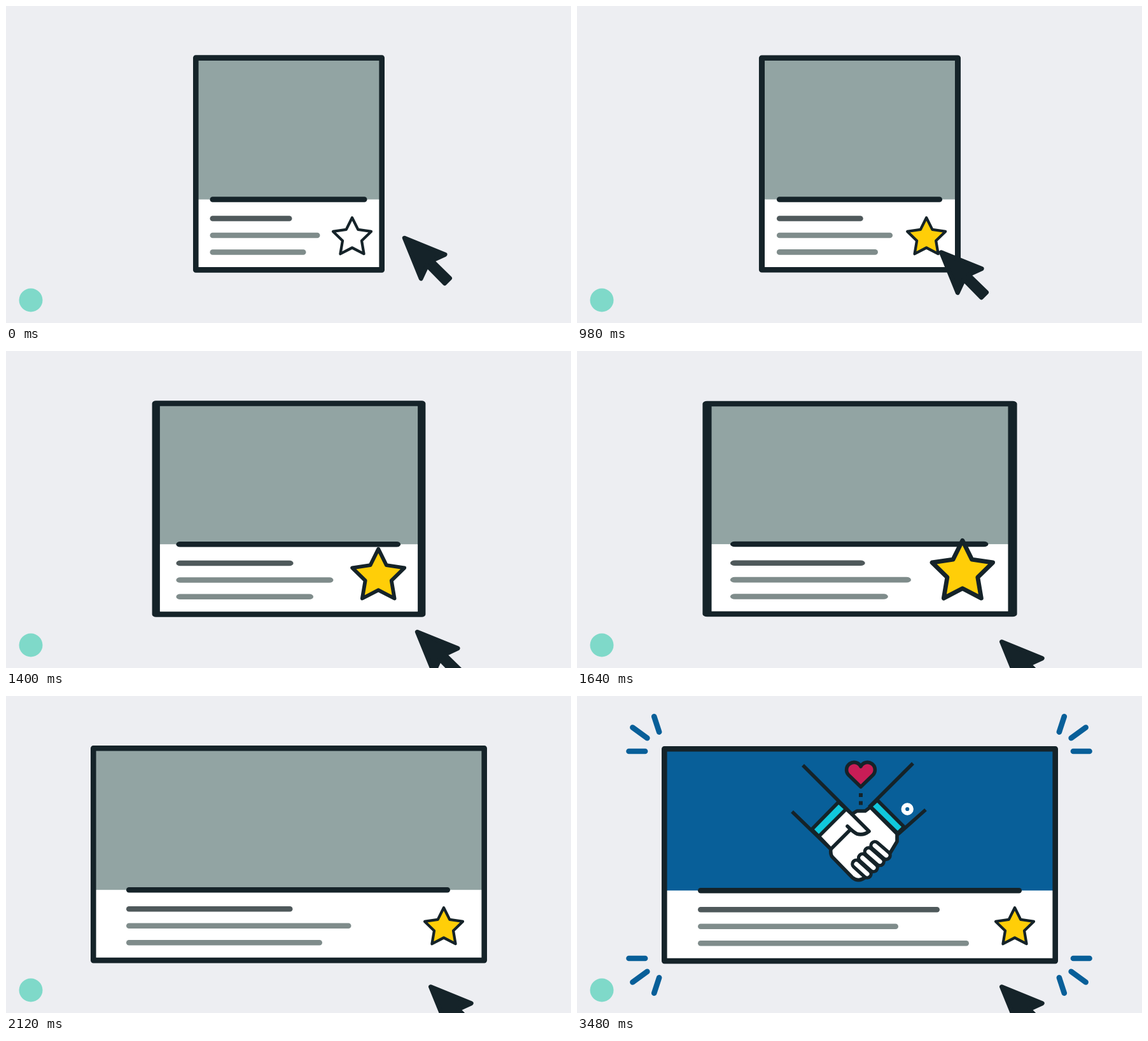
Recreate the animation shown at these times as an HTML page. Size 888 by 499 pixels, loop 4080 ms.

```html
<!DOCTYPE html>
<html lang="en">
<head>
<meta charset="utf-8">
<title>Card favourite</title>
<style>
html, body { margin: 0; width: 100%; height: 100%; overflow: hidden; background: #edeef2; }
svg { display: block; width: 100%; height: 100%; }
</style>
</head>
<body>
<svg id="stage" viewBox="0 0 888 499" fill="none" stroke-linecap="round" stroke-linejoin="round"></svg>
<script>
const INK = '#152329', GREY = '#92a4a3', SLATE = '#4f595b', MIST = '#7f8c8b';
const BLUE = '#085f99', PINK = '#c81d56', CYAN = '#10c8dc', GOLD = '#ffce08', MINT = '#7fd9c9';
const LOOP = 4080, STEP = 30, PEN = 8.6, HEIGHT = 342.4, DIVIDER = 227.2;

const path = (d, fill = 'none', width = 5.6, stroke = INK) =>
  `<path d="${d}" fill="${fill}" stroke="${stroke}" stroke-width="${width}"/>`;
const line = (x1, y1, x2, y2, color = INK, width = PEN) =>
  path(`M${x1} ${y1}L${x2} ${y2}`, 'none', width, color);
const rect = (x, y, w, h, attrs) =>
  `<rect x="${x}" y="${y}" width="${w}" height="${h}" ${attrs}/>`;
const group = (id, body) => `<g id="${id}">${body}</g>`;
const polar = (cx, cy, r, deg) => {
  const a = deg * Math.PI / 180;
  return [cx + r * Math.cos(a), cy + r * Math.sin(a)];
};

// A framed picture over four text bars: divider, heading and two lines.
function card(left, top, right, color, indent, widths, picture = '') {
  const x = left + PEN / 2, y = top + PEN / 2, w = right - left - PEN, h = HEIGHT - PEN;
  const bars = widths.map((len, i) => {
    const row = top + DIVIDER + 30 * Math.min(i, 1) + 26.5 * Math.max(i - 1, 0);
    return line(indent + PEN / 2, row, indent + len - PEN / 2, row, [INK, SLATE, MIST, MIST][i]);
  });
  return rect(x, y, w, h, 'fill="#fff"') +
    rect(x, y, w, DIVIDER - PEN / 2, `fill="${color}"`) + picture +
    rect(x, y, w, h, `stroke="${INK}" stroke-width="${PEN}"`) + bars.join('');
}

// Three strokes spread around a direction, the middle one further out.
function fan(cx, cy, dir, size, color) {
  return [-1, 0, 1].map(k => {
    const r = size * (k ? 1 : 1.11);
    return line(...polar(cx, cy, r * 0.555, dir + 36 * k), ...polar(cx, cy, r, dir + 36 * k), color);
  }).join('');
}

function starPath() {
  const points = Array.from({ length: 10 }, (_, i) =>
    polar(0, -27.3, i % 2 ? 15.8 : 31.5, 36 * i - 90).join(' '));
  return path(`M${points.join('L')}Z`, '#fff', 4.3);
}

// Half of the arrow, mirrored across its diagonal.
function arrowPath() {
  const half = [[63.7, 25.9], [42.9, 35.5], [71.2, 63.2]];
  const other = half.map(([x, y]) => [y, x]).reverse();
  return path(`M0 0L${[...half, ...other].join('L')}Z`, INK, 7);
}

function handshake() {
  let s = `<g stroke-linecap="butt">${path('M355 109L432 186M338 182L399 241M528 106L459 175M548 179L504 218')}</g>`;
  s += path('M411 167L432 186L440 181H453L461 175L503 217V229L488 254L455 284Q443 294 433 286L401 253Q398 249 399 241L380 221Z', '#fff');
  s += path('M411 167L423 178L380 221L369 210Z', CYAN);
  s += path('M472 164L514 206L504 216L461 174Z', CYAN);
  s += path('M432 186L459 213Q450 220 440 217Q434 214 425 205M430 210L400 240');
  for (let i = 0; i < 4; i++) {
    const finger = [439 + 9.7 * i, 264.5 - 9.7 * i, 456 + 10 * i, 280 - 9.7 * i];
    s += line(...finger, INK, 17.5) + line(...finger, '#fff', 7);
  }
  s += path('M446 143L427 124.5A11.8 11.8 0 1 1 446 111A11.8 11.8 0 1 1 465 124.5Z', PINK);
  s += rect(443, 153, 6, 6, `fill="${INK}"`) + rect(443, 165.5, 6, 6, `fill="${INK}"`);
  return s + '<circle cx="519.2" cy="178" r="6.4" stroke="#fff" stroke-width="6.6"/>';
}

const corners = [-1, 1].flatMap(sx => [-1, 1].map(sy => {
  const dir = Math.atan2(sy * Math.sin(Math.PI / 5), sx * Math.cos(Math.PI / 5)) * 180 / Math.PI;
  return fan(443.5 + 304.5 * sx, 250 + 163 * sy, dir, 57.5, BLUE);
})).join('');

document.getElementById('stage').innerHTML =
  rect(0, 0, 888, 499, 'fill="#edeef2"') +
  `<circle cx="39" cy="463" r="18.5" fill="${MINT}"/>` +
  group('narrow', card(294, 77.3, 595, GREY, 320.5, [247, 129, 173, 151])) +
  group('wide', card(133, 78, 756, GREY, 189, [509, 261.5, 353.5, 308])) +
  group('done', card(133, 79, 756, BLUE, 190, [509, 380, 315, 426], handshake())) +
  group('rays', corners) +
  group('star', starPath()) +
  group('sparks', fan(544, 350, -50, 52, PINK) + fan(532, 373, 157.5, 52, PINK)) +
  group('cursor', arrowPath());

const [narrow, wide, done, rays, star, sparks, cursor] =
  ['narrow', 'wide', 'done', 'rays', 'star', 'sparks', 'cursor'].map(id => document.getElementById(id));
const show = (node, on) => node.setAttribute('visibility', on ? 'visible' : 'hidden');
const move = (node, transform) => node.setAttribute('transform', transform);
const ramp = (t, a, b) => Math.min(1, Math.max(0, (t - a) / (b - a)));

function draw(ms) {
  // Movement advances in ticks that restart after the click.
  const base = ms < 800 ? 0 : 800;
  const t = base + Math.floor((ms - base) / STEP) * STEP;

  const come = ramp(t, 0, 600), leave = ramp(t, 800, 1520);
  move(cursor, `translate(${626.3 - 85.6 * come + 126.8 * leave} ${365.3 - come + 93.5 * leave})`);

  const grow = ramp(t, 920, 2120);
  move(narrow, `translate(444.5 253) scale(${1 + grow * 322 / 301} ${1 - 0.0135 * grow}) translate(-444.5 -253)`);

  const shrink = ramp(t, 1700, 2120);
  const x = 544 + 67 * ramp(t, 920, 1700) + 77 * shrink;
  const size = 1 + 0.65 * (ramp(t, 1010, 1700) - shrink);
  move(star, `translate(${x} 392) scale(${size})`);
  star.firstChild.setAttribute('fill', ms < 800 ? '#fff' : GOLD);

  show(sparks, ms >= 600 && ms < 800);
  show(narrow, ms < 2120);
  show(wide, ms >= 2120 && ms < 3480);
  show(rays, ms >= 2820);
  show(done, ms >= 2950);
}

let start;
function tick(now) {
  start ??= now;
  draw((now - start) % LOOP);
  requestAnimationFrame(tick);
}
draw(0);
requestAnimationFrame(tick);
</script>
</body>
</html>
```
